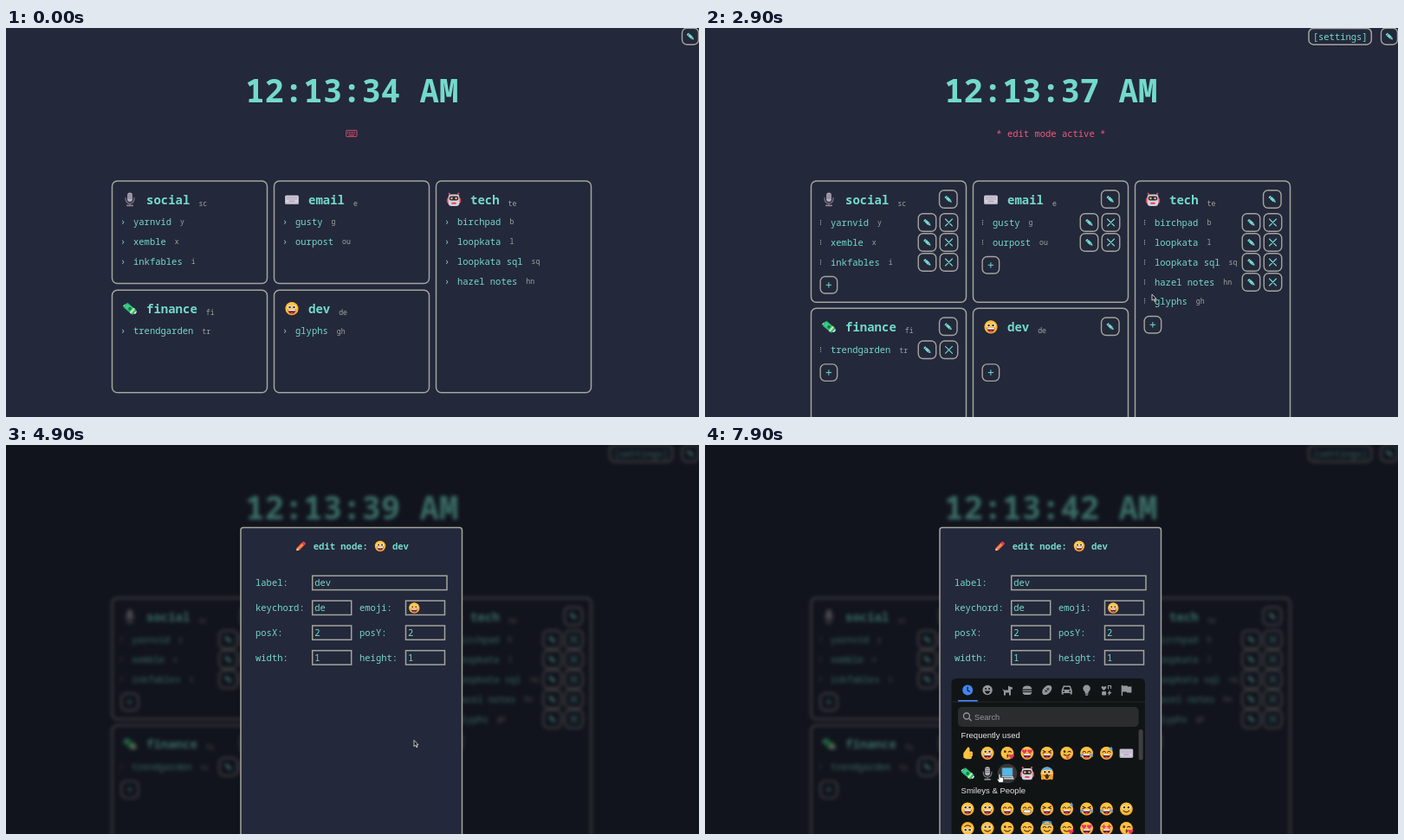
Animation of 800x450 px, one loop 8000 ms. Source, as an HTML page:

```html
<!DOCTYPE html>
<html lang="en">
<head>
<meta charset="utf-8">
<title>Start page</title>
<style>
html, body { margin: 0; width: 100%; height: 100%; overflow: hidden; background: #24283b; }
svg { display: block; width: 800px; height: 450px; font-family: "Noto Sans Mono", monospace; }
text { white-space: pre; }
.ui { font-family: "Liberation Sans", Arial, sans-serif; }
</style>
</head>
<body>
<svg id="stage" viewBox="0 0 800 450"></svg>
<script>
const LOOP = 8000, STEP = 100;
const BG = '#24283b', TEAL = '#73daca', RED = '#f7567c', LINE = '#a3a59b', DARK = '#4a2b1d';
const CHAR = 6.3, BIG_CHAR = 8.4;
const stage = document.getElementById('stage');

const cards = [
  { icon: 'mic', name: 'social', key: 'sc', col: 0, row: 0, items: [['yarnvid', 'y'], ['xemble', 'x'], ['inkfables', 'i']] },
  { icon: 'keyboard', name: 'email', key: 'e', col: 1, row: 0, items: [['gusty', 'g'], ['ourpost', 'ou']] },
  { icon: 'robot', name: 'tech', key: 'te', col: 2, row: 0, tall: true,
    items: [['birchpad', 'b'], ['loopkata', 'l'], ['loopkata sql', 'sq'], ['hazel notes', 'hn']] },
  { icon: 'money', name: 'finance', key: 'fi', col: 0, row: 1, items: [['trendgarden', 'tr']] },
  { icon: 'og', name: 'dev', key: 'de', col: 1, row: 1, items: [] }
];
const moved = ['glyphs', 'gh'];

// Pointer path: time, x, y
const route = [
  [300, 803, 18], [500, 791, 10], [1000, 791, 10], [1350, 322, 373], [1500, 322, 373], [1800, 332, 280],
  [2100, 335, 276], [2600, 510, 306], [2800, 516, 308], [3100, 516, 308], [3500, 504, 321], [4200, 504, 321],
  [4700, 471, 341.5], [5000, 471, 341.5], [5300, 482, 187], [5400, 482, 187], [5700, 470, 455],
  [7300, 400, 455], [7800, 340, 381]
];

const text = (x, y, s, size = 10.5, fill = TEAL, more = '') =>
  `<text x="${x}" y="${y}" font-size="${size}" fill="${fill}" ${more}>${s}</text>`;
const bold = (x, y, s, size) => text(x, y, s, size, TEAL, 'font-weight="700"');
const rect = (x, y, w, h, rx, fill = 'none', more = '') =>
  `<rect x="${x}" y="${y}" width="${w}" height="${h}" rx="${rx}" fill="${fill}" ${more}/>`;
const dot = (x, y, r, fill) => `<circle cx="${x}" cy="${y}" r="${r}" fill="${fill}"/>`;
const fill = (d, color) => `<path d="${d}" fill="${color}"/>`;
const line = (d, color, w = 1) =>
  `<path d="${d}" fill="none" stroke="${color}" stroke-width="${w}" stroke-linecap="round"/>`;
const at = (x, y, body, scale = 1, turn = 0) =>
  `<g transform="translate(${x} ${y}) rotate(${turn}) scale(${scale})">${body}</g>`;
const frame = (x, y, w, h, rx) => rect(x, y, w, h, rx, 'none', `stroke="${LINE}" stroke-width="1.5"`);

// Emoji live in a box of about 16 units around the origin
const heart = (x, y, s) => at(x, y, fill('M0 2C-4-1-1.6-3 0-1.2C1.6-3 4-1 0 2', '#f0306a'), s);
const eyes = {
  o: dot(-2.7, -1.8, 2.1, '#fff') + dot(2.7, -1.8, 2.1, '#fff') + dot(-2.5, -1.7, 1.3, DARK) + dot(2.5, -1.7, 1.3, DARK),
  '^': line('M-4.6-1q1.7-2.6 3.4 0M1.2-1q1.7-2.6 3.4 0', DARK, 1.2),
  x: line('M-4.8-3l3 1.5-3 1.2M4.8-3l-3 1.5 3 1.2', DARK, 1.1),
  w: dot(-2.7, -1.8, 1.4, DARK) + line('M1.2-1.4q1.7-1.5 3.4 0', DARK, 1.2),
  h: heart(-3.2, -2, 1.3) + heart(3.2, -2, 1.3),
  s: at(-3.1, -2, fill('M0-3L1-1 3 0 1 1 0 3-1 1-3 0-1-1Z', '#ef3370')) + at(3.1, -2, fill('M0-3L1-1 3 0 1 1 0 3-1 1-3 0-1-1Z', '#ef3370'))
};
const mouths = {
  g: fill('M-4.6 1H4.6Q4 6 0 6T-4.6 1', '#6b2030') + rect(-4, 1, 8, 1.6, .6, '#fff') + fill('M-2 5.2Q0 3.2 2 5.2Q0 6.4-2 5.2', '#f0506a'),
  t: rect(-4.4, 1, 8.8, 3.8, 1.9, '#fff', `stroke="${DARK}" stroke-width=".6"`),
  s: line('M-3.4 2.2Q0 5.2 3.4 2.2', DARK, 1.2),
  k: line('M0 1.6q2 .6 0 1.6q2 .6 0 1.6', DARK, 1.1),
  p: line('M-3.6 1.6Q0 4 3.6 1.6', DARK, 1.2) + rect(-.6, 2.6, 3.2, 4, 1.6, '#f0506a')
};
const extras = {
  d: fill('M5.4-8Q9-3.4 5.6-3.2T5.4-8', '#4aa8f0'),
  j: fill('M-4.4-.6Q-9 3-7 4.4T-4.4-.6M4.4-.6Q9 3 7 4.4T4.4-.6', '#4aa8f0'),
  a: `<ellipse cy="-6.6" rx="5" ry="1.7" fill="none" stroke="#4ba5f5" stroke-width="1.3"/>`,
  v: heart(5, 4, 1.4)
};
const face = code => {
  const [e, m, x] = code;
  const body = dot(0, 0, 7.6, '#f9a62b') + dot(-.3, -.6, 6.8, '#ffc342') + eyes[e] + mouths[m] + (extras[x] || '');
  return x === 'u' ? at(0, 0, body, 1, 180) : body;
};
const pictures = {
  mic: rect(-3, -8, 6, 10.5, 3, '#b5b0bd') + line('M-2.6-5.6H2.6M-2.6-3.6H2.6M-2.6-1.6H2.6', '#69656f', .8) +
    line('M-5-2Q-5 4.4 0 4.4T5-2M0 4.4V6.6', '#77727e', 1.3) + rect(-4, 6, 8, 1.8, .8, '#8b8691'),
  keyboard: rect(-8, -5, 16, 10.5, 1.5, '#b7afc3') + rect(-7, -4.2, 14, 8, 1, '#d8d1df') +
    `<path d="M-6-2.5H6M-6-.3H6" stroke="#aaa2b6" stroke-width="1.3" stroke-dasharray="1.4 .7"/>` + rect(-3.5, 1.3, 7, 1.3, .4, '#aaa2b6'),
  robot: rect(-8.2, -2, 16.4, 6, 1.5, '#e0444e') + line('M-5-4V-7M5-4V-7', '#b9b4c0') + dot(-5.4, -7, 1.1, '#e0444e') + dot(5.4, -7, 1.1, '#e0444e') +
    rect(-6.5, -6, 13, 13.5, 4, '#d6d0dc') + rect(-5.3, -4, 10.6, 5, 2.2, '#2c2a3c') +
    dot(-2.6, -1.5, 1.3, '#ffb34d') + dot(2.6, -1.5, 1.3, '#ffb34d') + rect(-2.8, 3.2, 5.6, 2, 1, '#e0445a'),
  money: fill('M-8-3Q-4-8-2-3L-4 0ZM8 3Q7 8 2 5L4 1Z', '#eee8f2') +
    at(0, 0, rect(-7, -3.7, 14, 7.4, 1, '#20a86b') + rect(-6, -2.7, 12, 5.4, .6, '#36cf83') + dot(0, 0, 1.9, '#137c52') + rect(2.8, -3.7, 1.8, 7.4, 0, '#e9e3a5'), 1, 40),
  laptop: rect(-6.5, -7, 13, 10, 1, '#7d8794') + rect(-5.6, -6, 11.2, 8, .4, '#4fb9ec') + fill('M-6.5 3H6.5L8 7H-8Z', '#b8c6d1') + line('M-5 4.6H5', '#65737e', .9),
  thumb: fill('M-5 0L0-7Q3-8 2.3-2H5Q7-1 5.8 1Q6.6 3 5 4Q5 7 2 7H-2L-5 5Z', '#ffc342') + line('M2 1H5M2 4H4.5', '#e89a2c', .8),
  scream: face('os') + fill('M-7-3Q-5-7.6 0-7.6T7-3Q0-6-7-3', '#54a6ed') + `<ellipse cy="3.6" rx="2" ry="3" fill="${DARK}"/>` +
    rect(-7, 1, 3.4, 6.5, 1.7, '#f5a12b') + rect(3.6, 1, 3.4, 6.5, 1.7, '#f5a12b')
};
const emoji = (name, x, y, scale) => at(x, y, pictures[name] || face(name), scale);

const icons = {
  pencil: c => at(0, 0, rect(-4.6, -1.6, 1.8, 3.2, .7, c) + rect(-2.5, -1.6, 5, 3.2, 0, c) + fill('M2.8-1.6L5.6 0 2.8 1.6Z', c), 1, 43),
  cross: c => line('M-4-4L4 4M4-4L-4 4', c, 1.1),
  plus: c => line('M-2.8 0H2.8M0-2.8V2.8', c, 1)
};

function pointer(t) {
  const next = route.findIndex(p => p[0] > t);
  if (next === 0) return [900, 900];
  if (next < 0) return route[route.length - 1].slice(1);
  const [t0, x0, y0] = route[next - 1], [t1, x1, y1] = route[next];
  const u = (t - t0) / (t1 - t0), k = u * u * (3 - 2 * u);
  return [x0 + (x1 - x0) * k, y0 + (y1 - y0) * k];
}

function page(t, [px, py]) {
  const edit = t >= 600, dragging = t >= 1500 && t < 3000;
  const holder = t < 1600 ? 'dev' : t < 2300 ? 'email' : 'tech';

  const button = (cx, cy, size, icon) => {
    const half = size / 2;
    const hot = t < 4900 && !dragging && Math.abs(px - cx) < half && Math.abs(py - cy) < half;
    const style = `stroke="${hot ? RED : LINE}" stroke-width="1.4" ${hot ? 'stroke-dasharray="2 1"' : ''}`;
    return rect(cx - half, cy - half, size, size, 5.5, 'none', style) + at(cx, cy, icons[icon](hot ? RED : TEAL));
  };

  const card = c => {
    const left = 122.5 + 187 * c.col, top = 177 + c.row * (edit ? 147.3 : 126.2);
    const high = edit ? 140.3 : 118.5, pitch = edit ? 147.3 : 126.2;
    const items = c.name === holder ? [...c.items, moved] : c.items;
    let out = frame(left, top, 179, c.tall ? high + pitch : high, 6);
    out += emoji(c.icon, left + 20.5, top + 21.5, 1);
    out += bold(left + 39.5, top + 27, c.name, 14);
    out += text(left + 49.5 + c.name.length * BIG_CHAR, top + 28.5, c.key, 8.2, LINE);
    if (edit) out += button(left + 158.3, top + 21, 20.5, 'pencil');
    items.forEach(([label, key], i) => {
      const lifted = dragging && label === moved[0];
      const cy = top + (edit ? 48 : 47) + 23 * i - (lifted ? 1.2 : 0), x = left + (edit ? 22.5 : 24.5);
      out += edit
        ? `<path d="M${left + 11} ${cy - 3}v7" stroke="${LINE}" stroke-width="1.1" stroke-dasharray="1.2 1.1"/>`
        : text(left + 9.5, cy + 4, '›');
      out += text(x, cy + 4, label) + text(x + 10 + label.length * CHAR, cy + 3.3, key, 8.2, LINE);
      if (edit && !lifted) out += button(left + 134, cy, 20.5, 'pencil') + button(left + 159, cy, 20.5, 'cross');
    });
    if (edit) {
      const slots = items.length + (c.name === 'dev' && dragging && holder !== 'dev' ? 1 : 0);
      out += button(left + 20.4, top + 51.3 + 23 * slots, 19.5, 'plus');
    }
    return out;
  };

  const second = 34 + Math.floor((t + 500) / 1000);
  let out = bold(276.2, 85.5, `12:13:${second} AM`, 37.3) + button(790, 9.7, 19, 'pencil');
  if (edit) {
    out += frame(697, .5, 72.3, 18.7, 5.5) + text(701.7, 13.6, '[settings]');
    out += text(336.3, 125.7, '* edit mode active *', 10.5, RED);
  } else {
    out += rect(392.8, 118.4, 12.2, 7.2, .5, 'none', `stroke="${RED}" stroke-width=".8"`) +
      `<path d="M394.2 120.4h9.6M394.2 122.1h9.6" stroke="${RED}" stroke-width=".9" stroke-dasharray="1 .6"/>` +
      line('M396 124h5.6', RED, .8);
  }
  return out + cards.map(card).join('');
}

const field = (x, y, w, value) => frame(x, y - 12, w, 16.3, 0) + text(x + 2.5, y, value);

function modal() {
  const pencil = at(340.5, 117, rect(-5, -2.2, 9, 4.4, 0, '#f0653a') + rect(-5, -.8, 9, 1.5, 0, '#ff9a4d') +
    rect(3, -2.2, 3.6, 4.4, 1.2, '#e43b55') + fill('M-5-2.2L-8 0-5 2.2Z', '#f4d3a5'), .95, -45);
  return rect(271, 95.5, 255.5, 380, 3, BG, `stroke="${LINE}" stroke-width="1.5"`) + pencil +
    bold(354.8, 121, 'edit node:') + emoji('og', 432, 117, .82) + bold(446, 121, 'dev') +
    text(288, 163.3, 'label:') + field(353.7, 163.3, 155.3, 'dev') +
    [['keychord:', 'de', 'emoji:', ''], ['posX:', '2', 'posY:', '2'], ['width:', '1', 'height:', '1']].map(([a, va, b, vb], i) => {
      const y = 192.2 + 28.8 * i;
      return text(288, y, a) + field(353.7, y, 45, va) + text(408, y, b) + field(461.5, y, 45, vb);
    }).join('') + emoji('og', 471.3, 188.6, .82);
}

const GREY = '#94979b', PANEL = '#111415';
const tabs = [
  dot(0, 0, 6, '#4285f4') + line('M0-3.4V.4L2.3 1.7', PANEL, 1.2),
  dot(0, 0, 5.7, GREY) + dot(-2, -1.5, 1, PANEL) + dot(2, -1.5, 1, PANEL) + fill('M-3.4 1H3.4Q2 4.4 0 4.4T-3.4 1', PANEL),
  fill('M-6-2L-4 0H1V-5L3-4 6-3V-1H4V6H2V3H-2V6H-4V2Z', GREY),
  fill('M-5.5-1Q-5-5 0-5T5.5-1ZM-5.5 2.6H5.5Q5 5.4 3 5.4H-3Q-5 5.4-5.5 2.6Z', GREY) + line('M-5 .8H5', GREY, 1.2),
  at(0, 0, `<ellipse rx="6.6" ry="4.3" fill="${GREY}"/>` + line('M-3 0H3M-1.5-1.4V1.4M1.5-1.4V1.4', PANEL, .9), 1, -45),
  fill('M-6 0L-4-5H4L6 0V5H4V3.5H-4V5H-6Z', GREY) + fill('M-4-.6L-3-3.6H3L4-.6Z', PANEL) + dot(-3.5, 1.5, .9, PANEL) + dot(3.5, 1.5, .9, PANEL),
  dot(0, -1.7, 4.2, GREY) + rect(-2, 1, 4, 3.2, 0, GREY) + rect(-1.7, 4.8, 3.4, 1.4, .7, GREY),
  at(-3, -2, fill('M0 2C-4-1-1.6-3 0-1.2C1.6-3 4-1 0 2', GREY), 1.3) + line('M2-1.5V-5H5V-2', GREY, 1.2) + rect(-5.4, 1.4, 5, 4.6, 1, GREY) + fill('M4 0L1 4H3L2 7 6 2.6H4Z', GREY),
  line('M-5-5V6', GREY, 1.4) + fill('M-4.5-5H1L2-4H6V3H1L0 2H-4.5Z', GREY)
];
const grid = [
  [356.5, 'thumb og wkv hg xg wp ^gj ^gd keyboard'],
  [380, 'money mic laptop robot scream'],
  [421, 'og og ^g ^t xg ^gd xgj ^gj os'],
  [443.5, 'osu os ws ^s ^sa ^sv hg sg wkv']
];

function picker(t, [px, py]) {
  const column = i => 303.2 + 22.9 * i;
  const caption = (y, s) => text(295.6, y, s, 9.5, '#e6e7e8', 'class="ui"');
  let out = `<path d="M284.5 460V276q0-6 6-6h211.500q6 0 6 6v184Z" fill="${PANEL}"/>`;
  out += tabs.map((tab, i) => at(column(i), 283.5, tab)).join('');
  out += rect(284.5, 296.7, 223.500, .8, 0, '#2b2d2f') + rect(292, 295, 23, 1.8, .9, '#4285f4');
  out += rect(292, 303, 208.6, 23, 5, '#2a2c2e');
  out += `<circle cx="302" cy="313.500" r="3.500" fill="none" stroke="${GREY}" stroke-width="1.300"/>` + line('M304.7 316.3l2.500 2.500', GREY, 1.3);
  out += text(311, 317.8, 'Search', 9.2, GREY, 'class="ui"');
  out += caption(338.5, 'Frequently used') + caption(402.5, 'Smileys &amp; People');
  for (const [y, row] of grid) {
    row.split(' ').forEach((name, i) => {
      const x = column(i);
      if (t >= 7300 && Math.hypot(px - x, py - y) < 11.4) out += dot(x, y, 11.3, '#35383a');
      out += emoji(name, x, y, .98);
    });
  }
  if (t >= 7400) out += rect(500.6, 329, 5, 35.500, 2.500, '#3d3f41');
  return out;
}

const outline = 'stroke-width=".8" stroke-linejoin="round"';
const cursors = {
  arrow: `<path d="M0 0V7.200L1.700 5.700 2.900 8.300 4 7.800 2.900 5.300H5Z" fill="#111" stroke="#eee" ${outline}/>`,
  grab: `<path d="M-3 0Q-3-2-1.500-1V-3Q-.5-4.500 .5-3.200Q2-4.500 2.500-2.700Q4-3.300 4 0Q4 4 2.500 4.500H-1Z" fill="#fff" stroke="#222" ${outline}/>`,
  hand: `<path d="M-1 0Q0-1.500 1 0V3.500Q2 2.500 2.800 3.600Q4.800 3 4.800 5Q4.800 9 3.300 9.500H-.5L-3 5.800Q-2.500 4.500-1 6Z" fill="#fff" stroke="#222" ${outline}/>`
};
const cursorKind = t =>
  (t >= 1300 && t < 1500) || (t >= 3500 && t < 4300) ? 'grab' : t >= 7300 ? 'hand' : 'arrow';

function draw(t) {
  const p = pointer(t), open = t >= 4900;
  let out = '<defs><filter id="soft" filterUnits="userSpaceOnUse" x="-20" y="-20" width="840" height="490"><feGaussianBlur stdDeviation="2"/></filter></defs>';
  out += rect(0, 0, 800, 450, 0, BG);
  out += `<g ${open ? 'filter="url(#soft)"' : ''}>${page(t, p)}</g>`;
  if (open) out += rect(0, 0, 800, 450, 0, '#000', 'opacity=".5"') + modal();
  if (t >= 5400) out += picker(t, p);
  stage.innerHTML = out + at(...p, cursors[cursorKind(t)]);
}

let shown = -1;
function tick() {
  const t = Math.floor(performance.now() % LOOP / STEP) * STEP;
  if (t !== shown) draw(shown = t);
  requestAnimationFrame(tick);
}
tick();
</script>
</body>
</html>
```
